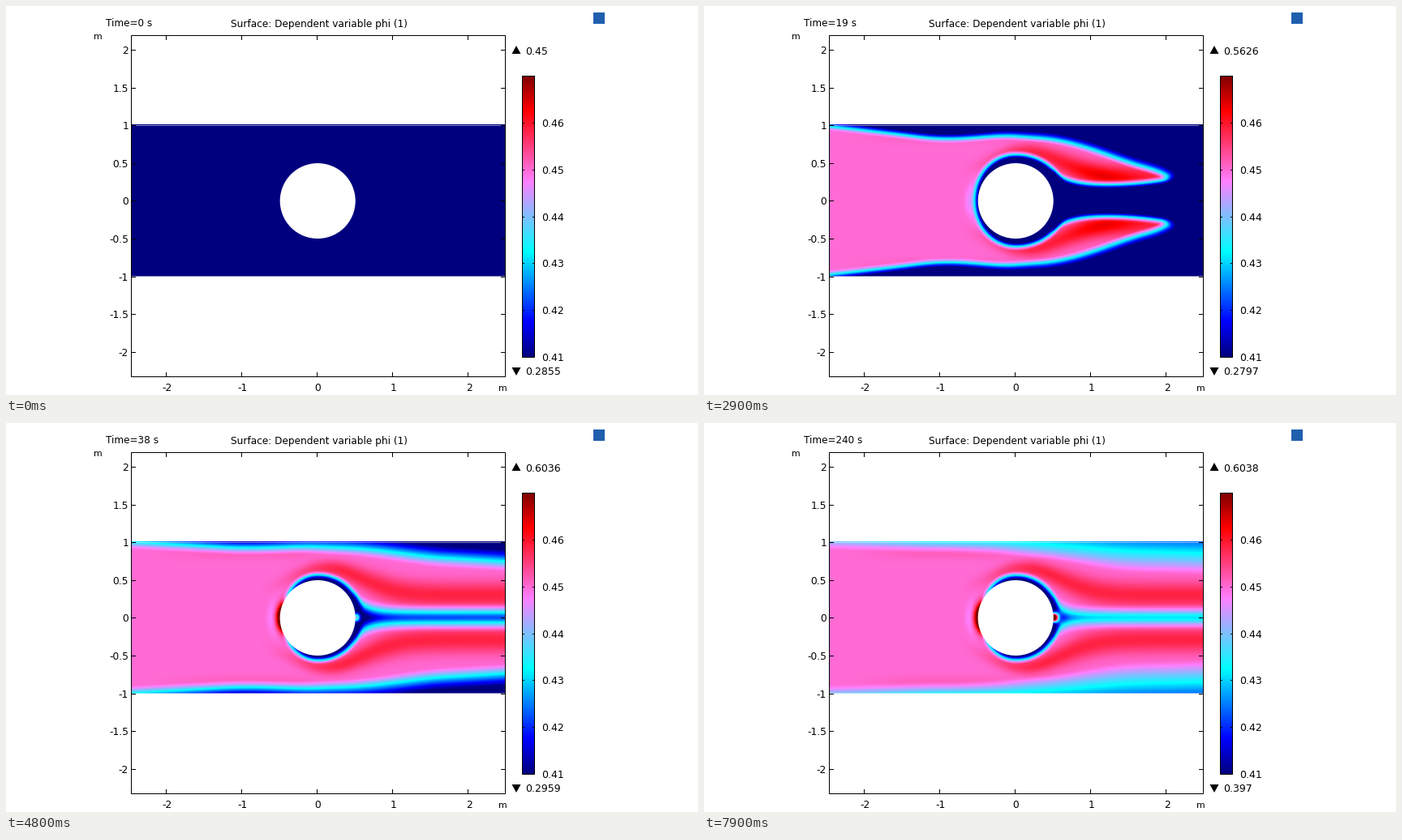
Animation, 853 px wide and 480 px high, one loop 8 s. Source, as a matplotlib script:

```python
import numpy as np
import matplotlib.pyplot as plt
from matplotlib.animation import FuncAnimation
from matplotlib.colors import LinearSegmentedColormap
from matplotlib.patches import Circle, Polygon, Rectangle

W, H, DPI = 853, 480, 100
CX, CY, UNIT = 384.2, 240.5, 93.0
LO, HI = 0.40, 0.45
SPEED = 0.24
plt.rcParams["font.family"] = "DejaVu Sans"

DISCO = LinearSegmentedColormap.from_list("disco", [
    (0, (0, 0, .5)), (.125, (0, 0, 1)), (.375, (0, 1, 1)),
    (.625, (1, .5, 1)), (.875, (1, 0, 0)), (1, (.5, 0, 0))], N=1024)


def ramp(v, a, b):
    """Smooth step from 0 at a to 1 at b."""
    u = np.clip((v - a) / (b - a), 0, 1)
    return u * u * (3 - 2 * u)


def edge(dist, width):
    return ramp(dist / width, -.5, .5)


def bump(v, width):
    return np.exp(-(v / width) ** 2)


# Upper half of the channel, one sample per pixel
xs = (np.arange(155, 615) + .5 - CX) / UNIT
X, Y = np.meshgrid(xs, (CY - np.arange(147, 241) - .5) / UNIT)
R = np.hypot(X, Y)
D = np.maximum(R - .5, 0)
COS = X / np.maximum(R, .1)
STAG = bump(np.pi - np.arctan2(Y, X), .38)

# The parabolic stream is lifted as it squeezes past the cylinder
LIFT = .6 * ramp(X, -1.3, 0) - .35 * ramp(X, .3, 1.7)
ETA = np.maximum((Y - LIFT) / (1 - LIFT), 0)

# Ridge of high concentration that passes over the cylinder
DY = Y - .29 - .36 * bump(X - .1, .68)
RIDGE = bump(DY, .1 + .08 * ramp(X, 0, 1))
STEADY = (HI + .0085 * ramp(X, -.8, .4) * RIDGE
          + .0015 * bump(Y - .85, .08) * ramp(X, -2.4, -1) * ramp(-X, -.2, .4))


def warp(t):
    """Slow the clock towards the steady state."""
    return t if t <= 46 else 66 - 20 * np.exp((46 - t) / 25)


def stream(t):
    """Inflow with a parabolic front; its edge softens with time."""
    reach = max(SPEED * t, 1e-3)
    front = 1 - ETA ** 2 - (X + 2.5) / reach
    dist = front / np.hypot(2 * ETA / (1 - LIFT), 1 / reach)
    late = max(t - 46, 0)
    width = (.07 + .006 * t) * (1 + (.5 + .055 * late) * ramp(X, -1, 1.5))
    return edge(dist + .0025 * max(t - 26, 0), width)


def layer(t):
    """Thin depleted layer around the cylinder."""
    thick = .045 - .115 * np.minimum(COS, 0) ** 2
    thick += .05 * np.exp((19 - max(t, 11)) / 8) * (1 + COS ** 2)
    return edge(D - thick, .15)


def wake(t):
    """Depleted strip behind the cylinder that closes with time."""
    young = np.exp((19 - max(t, 15)) / 15)
    half = (-.04 + .19 * young
            + .18 * np.exp(-np.maximum(X - .5, 0) / (.12 + .1 * young))
            + .11 * np.exp(np.minimum(X + 2.5 - SPEED * t, 0) / .5))
    dist = np.hypot(Y, .02) - .02 - half
    return np.where(X < .25, 1, edge(dist, .41 - .24 * young))


def field(t):
    t = warp(t)
    # Build-up ahead of the cylinder, then packets carried downstream
    k = t / 11
    left = -2.5 + 1.35 * k - 1.4 * k * Y ** 2
    phi = STEADY + (.008 * ramp(t, 0, 11) * ramp(-t, -16, -11)
                    * ramp(X - left, -.2, .2) * ramp(-X, .4, .7))
    phi += .008 * bump(t - 25, 9) * bump(X - 1.15 - .171 * (t - 19), .45) * bump(DY, .13)
    phi = LO + (phi - LO) * stream(t) * layer(t) * wake(t)

    # Stagnation points
    phi += .045 * ramp(t, 19, 32) * STAG * np.exp(-D / .035)
    phi -= .004 * ramp(t, 15, 19) * STAG * bump(D - .11, .06)
    phi += .08 * ramp(t, 32, 44) * bump(np.hypot(X - .5, Y), .06)
    return np.vstack([phi, phi[-2::-1]])


def clock(i):
    """Simulated seconds: fine steps, then one by one, then by twenty."""
    if i <= 10:
        return i / 10
    return i - 10 if i <= 70 else 60 + 20 * (i - 70)


LIMIT_T = [0, 11, 19, 26, 38, 46, 66]
TOP = [.45, .5222, .5626, .5988, .6036, .6038, .6038]
BOTTOM = [.2855, .2655, .2797, .2935, .2959, .3005, .397]

fig = plt.figure(figsize=((W + 1e-6) / DPI, (H + 1e-6) / DPI), dpi=DPI, facecolor="white")
ax = fig.add_axes([0, 0, 1, 1])
ax.axis("off")


def text(x, y, s, size=12.0, ha="left"):
    return ax.text(x, y, s, fontsize=size * 72 / DPI, ha=ha, va="baseline", color="black")


def line(x0, y0, x1, y1, color="black", alpha=1, z=4):
    ax.plot([x0, x1], [y0, y1], color=color, alpha=alpha, lw=72 / DPI,
            solid_capstyle="butt", snap=False, zorder=z)


def frame_box(x0, y0, x1, y1):
    ax.add_patch(Rectangle((x0, y0), x1 - x0, y1 - y0, fill=False, ec="black",
                           lw=72 / DPI, snap=False, zorder=4))


image = ax.imshow(field(0), cmap=DISCO, vmin=.41, vmax=.47, aspect="auto",
                  extent=(155, 615, 334, 147), interpolation="nearest")
ax.add_patch(Circle((CX, CY), .5 * UNIT, fc="white", ec="none", zorder=3))
for y in (147.5, 333.5):
    line(155, y, 615, y, "white", .5, 2)

# Plot frame, ticks and labels
frame_box(154.5, 36.5, 615.5, 457.5)
for v in np.arange(-2, 2.1, .5):
    y = round(240.4 - 93.1 * v) + .5
    line(155, y, 160, y)
    line(610, y, 615, y)
    text(151, y + 4.2, f"{v:g}", 12.2, "right")
for v in range(-2, 3):
    x = int(383.7 + 92.9 * v) + .5
    line(x, 37, x, 42)
    line(x, 452, x, 457)
    text(x + 1, 475, f"{v}", 12.2, "center")
text(108, 41, "m", 11)
text(606.5, 475, "m", 11)
text(277, 26, "Surface: Dependent variable phi (1)", 12.08)

# Colour bar
ax.imshow(np.linspace(1, 0, 347)[:, None], cmap=DISCO, aspect="auto", vmin=0, vmax=1,
          extent=(637, 651, 433, 87), interpolation="nearest")
frame_box(636.5, 86.5, 651.5, 433.5)
for k in range(6):
    y = int(433.5 - k * 57.83) + .5
    line(637, y, 639, y)
    line(649, y, 651, y)
    text(660.5, y + 4, f"{.41 + k / 100:.2f}", 12.5)
ax.add_patch(Polygon([(623.5, 59), (634.5, 59), (629, 49)], fc="black", ec="none"))
ax.add_patch(Polygon([(623.5, 446), (634.5, 446), (629, 456)], fc="black", ec="none"))
ax.add_patch(Rectangle((724, 8), 14, 14, fc="#1f5fae", ec="none"))

time_label = text(123, 24.6, "")
top_label = text(640, 60, "", 12.5)
bottom_label = text(640, 455, "", 12.5)
ax.set_xlim(0, W)
ax.set_ylim(H, 0)


def update(i):
    t = clock(i)
    image.set_data(field(t))
    time_label.set_text(f"Time={t:g} s")
    top_label.set_text(f"{np.interp(warp(t), LIMIT_T, TOP):.4g}")
    bottom_label.set_text(f"{np.interp(warp(t), LIMIT_T, BOTTOM):.4g}")
    return image, time_label, top_label, bottom_label


anim = FuncAnimation(fig, update, frames=80, interval=100, repeat=True,
                     repeat_delay=0, cache_frame_data=False)
plt.show()
```
